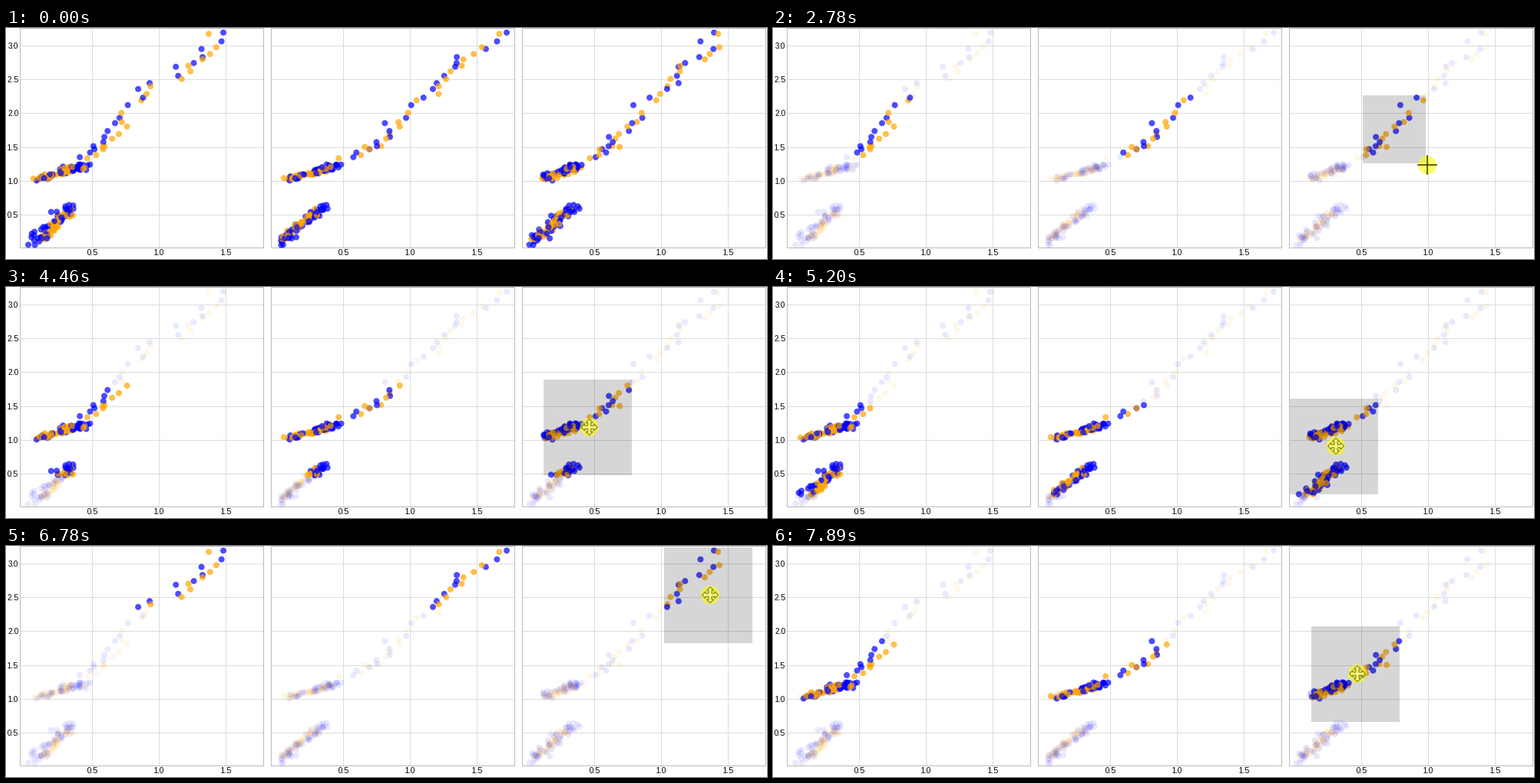
A matplotlib script for the animation above (7.99 s loop, 991 by 302 pixels).

```python
import numpy as np
import matplotlib.pyplot as plt
from matplotlib.animation import FuncAnimation
from matplotlib.patches import Circle, Polygon, Rectangle

W, H, DPI = 991, 302, 100
LOOP, INTERVAL = 7990, 34
TICK = 92.8  # ms between redraws of the recording
PX = 72 / DPI

plt.rcParams["font.family"] = "Liberation Sans"
plt.rcParams["text.hinting_factor"] = 1

# Spines of the three point clouds: y, then x in each panel, in pixels.
LOW = [(282, 38, 356, 684), (231, 83, 417, 740)]
MIDDLE = [(198, 46, 367, 698), (189, 72, 403, 724), (179, 98, 432, 744)]
TAIL = [(170, 106, 446, 766), (156, 124, 474, 784), (143, 136, 500, 800),
        (118, 148, 517, 820), (84, 172, 546, 850), (58, 228, 582, 876),
        (37, 248, 600, 907), (6, 283, 652, 922)]

# All motion below is timed in ticks.
APPEAR, ARRIVE, PRESS, BRUSH_ON = 7, 16, 19, 21
GROW_START, GROW_END, HOVER, GRAB = 20, 34, 35, 41
ENTRY, CORNER = np.array([874, 271]), np.array([768, 88])
FULL_SIZE, GRIP = np.array([115, 125]), np.array([60, 62])
DRAG = np.array([(41.5, 768, 88), (47, 705, 115), (53, 673, 153),
                 (55, 673, 153), (56, 673, 146), (66, 800, 51),
                 (73, 857, 2), (74, 857, 2), (85, 701, 105)])

BLUE, ORANGE = (0, 0, 1), (1, 165 / 255, 0)
LIT, DIM = 0.7, 0.085


def progress(t, start, end):
    return np.clip((t - start) / (end - start), 0, 1)


def along(spine, u):
    """Rows at fractions u of the way along a spine."""
    pos = np.asarray(u) * (len(spine) - 1)
    return np.column_stack([np.interp(pos, range(len(spine)), col)
                            for col in zip(*spine)])


def cloud(rng, spine, u, spread, shift=(0, 0, 0, 0)):
    rows = along(spine, u)
    return rows + rng.normal(0, 1, rows.shape) * spread + shift


def make_points():
    rng = np.random.default_rng(12)
    blue = [
        cloud(rng, LOW, rng.uniform(0, 1, 48), (2.5, 6, 4, 6)),
        cloud(rng, MIDDLE, rng.uniform(0, 1, 38), (2, 8, 4, 6)),
    ]
    orange = [
        cloud(rng, LOW, rng.uniform(0.1, 0.85, 36), (2, 4, 3, 4),
              (0, 5, -4, 0)),
        cloud(rng, MIDDLE, rng.uniform(0, 0.9, 34), (1.3, 7, 4, 6)),
    ]
    tail = cloud(rng, TAIL, np.linspace(0, 1, 40), (2, 8, 8, 7))
    tail[-1] = TAIL[-1]
    blue = np.vstack(blue + [tail[1::2]])
    orange = np.vstack(orange + [tail[::2]])
    rows = np.vstack([blue, orange])
    rgb = np.array([BLUE] * len(blue) + [ORANGE] * len(orange))
    order = rng.permutation(len(rows))
    return rows[order], rgb[order]


fig = plt.figure(figsize=(W / DPI, H / DPI), dpi=DPI, facecolor="white")
ax = fig.add_axes([0, 0, 1, 1])
ax.set_xlim(0, W)
ax.set_ylim(H, 0)
ax.axis("off")


def line(xs, ys, color):
    ax.plot(xs, ys, color=color, lw=PX, snap=False, zorder=1)


def draw_panel(left):
    right, top, bottom = left + 317, 0.5, 287.5
    for i in range(6):
        y = int(23.5 + 44.2 * i) + 0.5
        line([left, right], [y, y], "#dcdcdc")
    for i in range(3):
        x = left + 94 + 87 * i
        line([x, x], [top, bottom], "#dcdcdc")
        ax.text(x, 297, f"{0.5 * (i + 1):.1f}", size=10 * PX, ha="center")
    line([left, right, right, left, left],
         [top, top, bottom, bottom, top], "#bbbbbb")


for i in range(3):
    draw_panel(18.5 + 327 * i)
for i in range(6):
    ax.text(16, 27 + 44.2 * i, f"{3 - 0.5 * i:.1f}", size=10 * PX, ha="right")

points, rgb = make_points()
dots = [ax.scatter(points[:, i], points[:, 0], s=(8 * PX) ** 2,
                   linewidths=0, zorder=2) for i in (1, 2, 3)]

brush = ax.add_patch(Rectangle((0, 0), 1, 1, fc=(0, 0, 0, 0.16), lw=0,
                               zorder=3))
halo = ax.add_patch(Circle((0, 0), 12, lw=0, zorder=4))
cross = [ax.plot([], [], color="#3c3c0c", lw=1.6 * PX, zorder=5)[0]
         for _ in range(2)]

# Four-way arrow built from one arm turned by quarter circles.
arms = [np.array([(-2, -2), (-2, -6), (-4.5, -6), (0, -10.5), (4.5, -6),
                  (2, -6)])]
for _ in range(3):
    arms.append(np.column_stack([-arms[-1][:, 1], arms[-1][:, 0]]))
ARROWS = np.vstack(arms)
arrows = ax.add_patch(Polygon(ARROWS, fc="#f8f878", ec="#77771c", lw=PX,
                              zorder=5))


def brush_box(t):
    pos = np.array([np.interp(t, DRAG[:, 0], col) for col in DRAG[:, 1:].T])
    return pos, FULL_SIZE * progress(t, GROW_START, GROW_END)


def cursor_at(t):
    if t < GROW_START:
        left = (1 - progress(t, APPEAR, ARRIVE)) ** 1.3
        return CORNER + (ENTRY - CORNER) * left
    pos, size = brush_box(t)
    tip = pos + size + 2
    return tip + (pos + GRIP - tip) * progress(t, HOVER - 1, HOVER + 4)


def draw_brush(t):
    active = t >= BRUSH_ON
    brush.set_visible(active)
    alpha = np.full(len(points), LIT)
    if active:
        pos, size = brush_box(t)
        brush.set_bounds(*pos, *size)
        xy = points[:, [3, 0]]
        inside = ((xy >= pos) & (xy <= pos + size)).all(axis=1)
        alpha = np.where(inside, LIT, DIM)
    colors = np.column_stack([rgb, alpha])
    for d in dots:
        d.set_facecolors(colors)


def draw_cursor(t):
    shown, moving = t >= APPEAR, t >= HOVER
    x, y = cursor_at(t)
    pressed = PRESS <= t < HOVER or t >= GRAB
    halo.set_visible(shown)
    halo.set_center((x, y))
    halo.set_facecolor((1, 1, 0, 0.6 if pressed else 0.45))
    cross[0].set_data([x - 12, x + 12], [y, y])
    cross[1].set_data([x, x], [y - 12, y + 12])
    for c in cross:
        c.set_visible(shown and not moving)
    arrows.set_visible(moving)
    arrows.set_xy(ARROWS + (x, y))


def update(frame):
    t = (frame + 1) * INTERVAL // TICK
    draw_brush(t)
    draw_cursor(t)
    return [*dots, brush, halo, *cross, arrows]


anim = FuncAnimation(fig, update, frames=LOOP // INTERVAL, interval=INTERVAL,
                     repeat=True, repeat_delay=0, blit=False)
plt.show()
```
